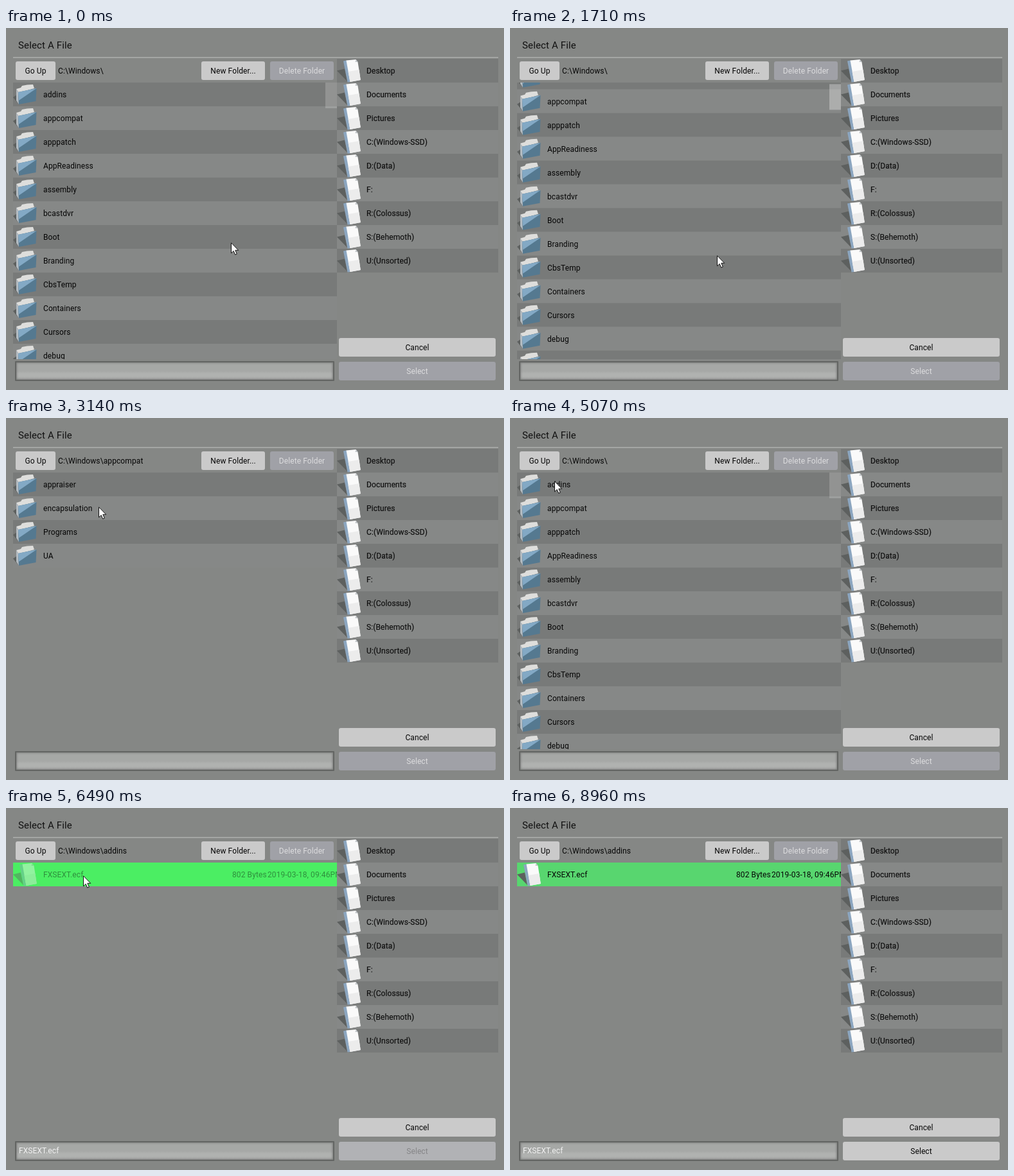
Write an HTML page that moves like this. It is 775x564 px and loops after 9.06 s.

```html
<!DOCTYPE html>
<html lang="en">
<head>
<meta charset="utf-8">
<title>Select A File</title>
<style>
html, body { margin: 0; width: 100%; height: 100%; overflow: hidden; background: #858785; }
#stage {
  position: relative; width: 775px; height: 564px; overflow: hidden;
  background: #858785; color: #050505; cursor: default;
  font: 12px Roboto, "Liberation Sans", sans-serif; letter-spacing: .1px; white-space: pre;
}
#stage > *, .row > *, .list, #bar { position: absolute; }
.title { left: 19px; top: 14px; line-height: 26px; font-size: 15px; letter-spacing: .15px; color: #111; }
.rule { left: 11px; top: 45px; width: 755px; height: 2px; background: #a4a6a4; }
.btn {
  box-sizing: border-box; height: 29px; padding-top: 1px; line-height: 29px;
  border-radius: 3px; background: #cacaca; text-align: center;
}
.off { background: #a0a1a7; color: #dcdcde; }
#path { left: 81px; top: 53px; line-height: 29px; }
#view { left: 11px; top: 85px; width: 504px; height: 431px; overflow: hidden; }
.list { left: 0; top: 0; width: 100%; }
.row { position: relative; height: 37px; line-height: 37px; background: #868887; }
.row:nth-child(odd) { background: #787a79; }
.row svg { left: 0; top: 0; width: 38px; height: 37px; overflow: visible; }
.row span { left: 47px; top: 1px; }
#view .size { left: 341px; }
#view .date { left: 396px; }
#bar { right: 0; top: 0; width: 18px; height: 40px; background: #fff; }
#places { left: 515px; top: 48px; width: 251px; }
#places .row { color: #101010; -webkit-text-stroke: .2px #101010; }
#places span { left: 46px; }
#field {
  box-sizing: border-box; left: 14px; top: 519px; width: 497px; height: 31px; padding-left: 4px;
  border: 2px solid #636563; border-radius: 1px; line-height: 27px; color: #f2f2f2;
  background: linear-gradient(#a6a8a6 50%, #b0b2b0 65%, #b0b2b0 80%, #a6a8a6);
  box-shadow: inset 0 0 3px 1px #7c7e7c;
}
#pointer { left: 0; top: 0; width: 40px; height: 40px; overflow: visible; }
</style>
</head>
<body>
<svg width="0" height="0" style="position:absolute">
  <symbol id="folder" viewBox="0 0 38 37" overflow="visible">
    <path d="M0 23 6 19 9 34Z" fill="#5d605f"/>
    <path d="M5 10 12 8 14 5 22 3.500 31 3 33 9 9 16Z" fill="#dededc"/>
    <path d="M5 10 8 15 9 34 5 28Z" fill="#b4bcc2"/>
    <path d="M8 15 36.500 9 35.500 29 9 34Z" fill="#557990"/>
    <path d="M8 15 36.500 9 8.800 28Z" fill="#83a9c5"/>
  </symbol>
  <symbol id="file" viewBox="0 0 38 37" overflow="visible">
    <path d="M0 18.500 12 15.500 16 35Z" fill="#5d605f"/>
    <path d="M10 3.500 15 2.500 21 36 16.500 36.500Z" fill="#8ca6c0"/>
    <path d="M14.500 2.500 29.500 1 32.500 5 36.800 33 20.500 36Z" fill="#fafafa"/>
    <path d="M17.500 20 34.500 17 36.800 33 20.500 36Z" fill="#ececec"/>
    <path d="M29.500 1 28.500 5 32.500 5Z" fill="#c3c7ca"/>
  </symbol>
</svg>
<div id="stage">
  <div class="title">Select A File</div>
  <div class="rule"></div>
  <div class="btn" id="up" style="left:15px;top:52px;width:62px">Go Up</div>
  <div id="path"></div>
  <div class="btn" style="left:304px;top:52px;width:99px">New Folder...</div>
  <div class="btn off" style="left:411px;top:52px;width:99px">Delete Folder</div>
  <div id="view"><div id="bar"></div></div>
  <div id="places"></div>
  <div id="field"></div>
  <div class="btn" style="left:518px;top:483px;width:244px">Cancel</div>
  <div class="btn" id="select" style="left:518px;top:520px;width:244px">Select</div>
  <svg id="pointer">
    <g id="ring">
      <circle r="9.500" fill="#fff" fill-opacity=".2" stroke="#222" stroke-width="2.400"/>
      <circle r="9.300" fill="none" stroke="#eee"/>
    </g>
    <path d="M.5 .8V16.800L4.200 13.400 6.700 19.200 9.300 18.100 6.800 12.300H11.700Z" fill="#fff" stroke="#111"/>
  </svg>
</div>
<script>
const LOOP = 9060, VIEW = 431, CONTENT = 4640;
const TAP = 90, GRAB = 550, RELEASE = 1640, EXIT = 8120;
const [OPEN, BACK, REOPEN, PICK] = [2600, 4480, 5330, 6310];
const $ = id => document.getElementById(id);

const windowsDirs = ["addins", "appcompat", "apppatch", "AppReadiness", "assembly", "bcastdvr",
  "Boot", "Branding", "CbsTemp", "Containers", "Cursors", "debug", "diagnostics", "DiagTrack",
  "DigitalLocker", "Downloaded Program Files", "ELAMBKUP", "en-US", "Fonts", "Globalization",
  "Help", "IdentityCRL", "IME", "INF", "InputMethod"];
const drives = ["Desktop", "Documents", "Pictures", "C:(Windows-SSD)", "D:(Data)", "F:",
  "R:(Colossus)", "S:(Behemoth)", "U:(Unsorted)"];

const row = (name, icon, extra = "") =>
  `<div class="row"><svg><use href="#${icon}"/></svg><span>${name}</span>${extra}</div>`;

function addList(names, icon, extra) {
  const el = document.createElement("div");
  el.className = "list";
  el.innerHTML = names.map(n => row(n, icon, extra)).join("");
  $("view").insertBefore(el, $("bar"));
  return el;
}

const root = addList(windowsDirs, "folder");
const compat = addList(["appraiser", "encapsulation", "Programs", "UA"], "folder");
const addins = addList(["FXSEXT.ecf"], "file",
  '<span class="size">802 Bytes</span><span class="date">2019-03-18, 09:46PM</span>');
const fileRow = addins.firstChild;
$("places").innerHTML = drives.map(d => row(d, "file")).join("");

// Folder shown from each time on
const visits = [
  [-LOOP, root, ""],
  [OPEN + TAP, compat, "appcompat"],
  [BACK + TAP, root, ""],
  [REOPEN + TAP, addins, "addins"]
];
// Pointer moves: start, end, x, y
const moves = [
  [290, GRAB, 346, 404],
  [560, 1350, 336, 0],
  [1360, RELEASE, 322, 354],
  [1790, 2420, 144, 138],
  [3510, 4210, 56, 64],
  [4570, 4980, 69, 98],
  [5780, 6080, 120, 105],
  [6950, 7250, 463, 346],
  [7670, EXIT, 674, 564]
];

const ramp = (t, a, b) => Math.max(0, Math.min(1, (t - a) / (b - a)));
const ease = p => p * p * (3 - 2 * p);
const lerp = (a, b, p) => a + (b - a) * p;
const mix = (a, b, p) => `rgb(${a.map((v, i) => Math.round(lerp(v, b[i], p)))})`;
const show = (el, on) => { el.style.display = on ? "" : "none"; };

function pointerAt(t) {
  let x = 350, y = 334;
  for (const [from, to, toX, toY] of moves) {
    const p = ease(ramp(t, from, to));
    x = lerp(x, toX, p);
    y = lerp(y, toY, p);
  }
  return [Math.round(x), Math.round(y)];
}

// Follows the drag, then glides out to the top
function scrollAt(t) {
  if (t < GRAB) return 0;
  return t < RELEASE ? 404 - pointerAt(t)[1] : 50 * Math.exp((RELEASE - t) / 111);
}

function drawList(t) {
  const [since, list, name] = visits.filter(v => v[0] <= t).pop();
  for (const el of [root, compat, addins]) show(el, el === list);
  list.style.opacity = ramp(t, since - 60, since + 300);
  $("path").textContent = "C:\\Windows\\" + name;

  const scroll = scrollAt(t);
  root.style.transform = `translateY(${-scroll}px)`;
  show($("bar"), list === root);
  $("bar").style.transform = `translateY(${scroll * VIEW / CONTENT}px)`;
  $("bar").style.opacity = .19 + .12 * (ramp(t, GRAB, GRAB + TAP) - ramp(t, 2150, 2420));
}

function drawPick(t) {
  const picked = t >= PICK + 40, p = ramp(t, PICK + 40, PICK + 390);
  fileRow.style.background = picked ? mix([66, 255, 91], [88, 214, 111], p) : "";
  for (const part of fileRow.children) part.style.opacity = picked ? p : 1;
  $("field").textContent = picked ? "FXSEXT.ecf" : "";
  $("select").style.background = mix([160, 161, 167], [202, 202, 202], p);
  $("select").style.color = mix([220, 220, 222], [5, 5, 5], p);
}

function drawPointer(t) {
  const tapping = tap => t >= tap && t < tap + TAP;
  const dragging = t >= GRAB && t < RELEASE;
  show($("ring"), dragging || [OPEN, BACK, REOPEN, PICK].some(tapping));
  $("up").style.background = tapping(BACK) ? "#b4b4b4" : "";
  $("pointer").style.transform = `translate(${pointerAt(t).map(v => v + "px")})`;
  show($("pointer"), t < EXIT);
}

const start = performance.now();
function tick() {
  const t = (performance.now() - start) % LOOP;
  drawList(t);
  drawPick(t);
  drawPointer(t);
  requestAnimationFrame(tick);
}
tick();
</script>
</body>
</html>
```
